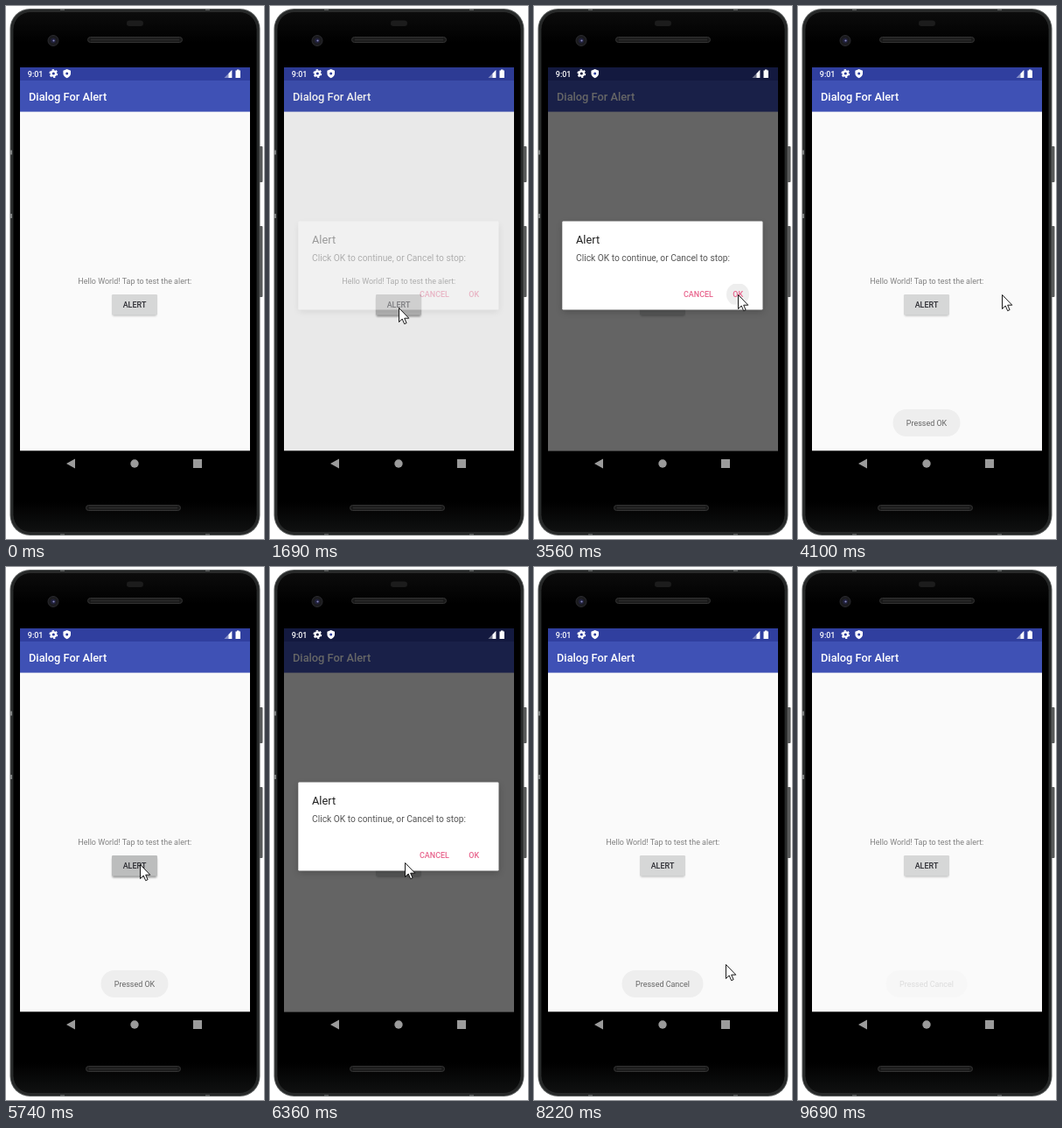
Write an HTML page that moves like this. It is 295x608 px and loops after 9.77 s.

```html
<!DOCTYPE html>
<html lang="en">
<head>
<meta charset="utf-8">
<title>Dialog For Alert</title>
<style>
  html, body { margin: 0; width: 100%; height: 100%; overflow: hidden; background: #fff; }
  svg { display: block; width: 295px; height: 608px; }
  text { font-family: Roboto, sans-serif; font-size: 8.96px; }
  .mid { text-anchor: middle; }
  .bold { font-weight: 500; }
  .big { font-size: 12.8px; }
</style>
</head>
<body>
<svg viewBox="0 0 295 608" xmlns="http://www.w3.org/2000/svg">
  <defs>
    <linearGradient id="face" x1="0" y1="0" x2="0" y2="1">
      <stop offset="0" stop-color="#0c0c0c"/>
      <stop offset=".06" stop-color="#000"/>
      <stop offset=".94" stop-color="#000"/>
      <stop offset="1" stop-color="#101111"/>
    </linearGradient>
    <filter id="soft" x="-20%" y="-30%" width="140%" height="180%">
      <feGaussianBlur stdDeviation="4"/>
    </filter>
    <filter id="near" x="-20%" y="-40%" width="140%" height="190%">
      <feGaussianBlur stdDeviation=".9"/>
    </filter>
    <clipPath id="btnClip"><rect x="121" y="329" width="52" height="23.5" rx="1.3"/></clipPath>
    <clipPath id="okClip"><rect x="213" y="317" width="41" height="23.5" rx="1.3"/></clipPath>
  </defs>

  <!-- phone body -->
  <g>
    <rect x="289" y="160" width="4.5" height="41" rx="1" fill="#585a5a"/>
    <rect x="289" y="251" width="4.5" height="81" rx="1" fill="#585a5a"/>
    <rect x="4.5" y="3" width="286" height="601" rx="23" fill="#565959"/>
    <rect x="5.5" y="4" width="284" height="599" rx="22" fill="#262828"/>
    <rect x="8" y="6.5" width="279" height="594" rx="20" fill="url(#face)" stroke="#303232" stroke-width=".7"/>
    <path d="M5 167H7M5 239.5H7" stroke="#808383" stroke-width="5"/>
    <path d="M62 4H67M228 4H233M62 603H67M228 603H233" stroke="#707373" stroke-width="1.5"/>
    <rect x="138" y="16.5" width="19" height="6.5" rx="3.2" fill="#1c1c1c"/>
    <circle cx="54" cy="39.5" r="6" fill="#1b1b1e" stroke="#2a2a2e"/>
    <circle cx="54" cy="39.5" r="3" fill="#20203a"/>
    <circle cx="54.5" cy="39.5" r="1.1" fill="#8a8cc4"/>
    <rect x="93.5" y="35.5" width="108" height="6" rx="3" fill="#191919" stroke="#343434"/>
    <path d="M97 38.5H198" stroke="#292929" stroke-width="2"/>
    <rect x="91.5" y="569.5" width="108" height="6" rx="3" fill="#191919" stroke="#343434"/>
    <path d="M95 572.5H196" stroke="#292929" stroke-width="2"/>
    <g fill="#9b9b9b">
      <path d="M69 522L79 516.5V527.5Z"/>
      <circle cx="147" cy="522" r="4.7"/>
      <rect x="214" y="517" width="10" height="10"/>
    </g>
  </g>

  <!-- app -->
  <rect x="16" y="70" width="263" height="437.3" fill="#fafafa"/>
  <rect x="16" y="70" width="263" height="15" fill="#303f9f"/>
  <rect x="16" y="85" width="263" height="35.6" fill="#3f51b5"/>
  <text class="big bold" x="26" y="108" fill="#fff">Dialog For Alert</text>
  <text class="mid" x="147.3" y="317.3" fill="#808080">Hello World! Tap to test the alert:</text>
  <rect x="122" y="331" width="50" height="22.5" rx="1.3" opacity=".25" filter="url(#near)"/>
  <rect id="lift" x="121.5" y="332" width="51" height="22.5" rx="1.3" filter="url(#near)"/>
  <rect x="121" y="329" width="52" height="23.5" rx="1.3" fill="#d6d7d7"/>
  <g clip-path="url(#btnClip)"><circle id="ripple"/></g>
  <text class="mid bold" x="147" y="344" fill="#2a2a30">ALERT</text>

  <rect id="dim" x="16" y="70" width="263" height="437.3"/>

  <!-- status icons stay bright -->
  <g fill="#fff">
    <text class="bold" x="24.8" y="80.6">9:01</text>
    <circle cx="54.3" cy="77" r="2.7" fill="none" stroke="#fff" stroke-width="2.2"/>
    <circle cx="54.3" cy="77" r="4.2" fill="none" stroke="#fff" stroke-width="1.5" stroke-dasharray="2.2 2.198"/>
    <path d="M69.7 72L74 73.7V77Q73.8 80.5 69.7 82.3Q65.6 80.5 65.4 77V73.7Z"/>
    <circle cx="69.7" cy="77" r="1.5" fill="#303f9f"/>
    <path d="M249.5 82L258.3 73V82Z" opacity=".4"/>
    <path d="M254.5 77V82H258.3V73Z"/>
    <path d="M262.5 73.5H264V72.5H266.5V73.5H268V82H262.5Z"/>
  </g>

  <g id="dialog">
    <rect x="33" y="249" width="228.5" height="100" opacity=".2" filter="url(#soft)"/>
    <rect x="32.3" y="245.5" width="229.2" height="101" rx="1.3" fill="#fff"/>
    <text class="big" x="48" y="270.6" fill="#222">Alert</text>
    <text x="48" y="290.5" fill="#555" style="font-size:10.24px">Click OK to continue, or Cancel to stop:</text>
    <g clip-path="url(#okClip)"><circle id="okRipple" cx="233" cy="329" fill="#eee"/></g>
    <g class="bold" fill="#e8638c">
      <text x="171" y="331.6">CANCEL</text>
      <text x="227.3" y="331.6">OK</text>
    </g>
  </g>

  <g id="toast">
    <rect id="pill" y="460" height="31" rx="15.5" fill="#eee"/>
    <text id="note" class="mid" x="147" y="479.3" fill="#666"></text>
  </g>

  <path id="cursor" d="M.5 .5V16.5L4.2 13L6.7 18.7L9.1 17.6L6.7 12.2H11.8Z"
        fill="#fff" stroke="#000" stroke-width=".9"/>
</svg>

<script>
const LOOP = 9770, START = 300, STEP = 77.6;
const el = {};
document.querySelectorAll('[id]').forEach(e => el[e.id] = e);

const set = (e, attrs) => { for (const n in attrs) e.setAttribute(n, attrs[n]); };
const ramp = (k, from, length) => Math.min(1, Math.max(0, (k - from) / length));

const smooth = u => u * u * (3 - 2 * u);
const speedUp = u => u ** 1.5;
const slowDown = u => 1 - (1 - u) ** 2;

// Each round: button press, dialog opening, dialog closing, toast end (in steps)
const rounds = [
  { press: 12, x: 147, y: 344, open: 17, opening: 3, close: 42, fade: 70, note: 'Pressed OK', half: 38.5 },
  { press: 66, x: 153, y: 339, open: 70, opening: 4, close: 88, fade: 117, note: 'Pressed Cancel', half: 46.5 }
];

const moves = [
  { at: 0, steps: 10, to: [147, 344], ease: slowDown },
  { at: 24, steps: 13, to: [233, 329], ease: smooth },
  { at: 51, steps: 13, to: [153, 339], ease: smooth },
  { at: 77, steps: 10, to: [184, 330], ease: smooth, arc: 17 },
  { at: 92, steps: 9, to: [217, 445], ease: smooth },
  { at: 101, steps: 7, to: [255, 591], ease: speedUp }
];

function pointer(k) {
  let [x, y] = [246, 571];
  for (const { at, steps, to, ease, arc = 0 } of moves) {
    const u = ease(ramp(k, at, steps));
    x += (to[0] - x) * u;
    y += (to[1] - y) * u - arc * Math.sin(Math.PI * u);
  }
  return [Math.round(x), Math.round(y)];
}

function drawPress(n, x, y) {
  const hold = n < 0 ? 0 : 1 - ramp(n, 6, 2);
  set(el.ripple, { cx: x, cy: y, r: 12 * (1 + Math.max(0, n - 1) ** 2), opacity: .12 * hold });
  set(el.lift, { opacity: .25 * ramp(n, 2, 2) * hold });
}

function drawDialog(k, { open, opening, close }) {
  const u = ramp(k, open, opening), left = 1 - ramp(k, close, 4);
  set(el.dim, { opacity: .6 * u * u * left });
  set(el.dialog, { opacity: u ** .85 * left * left });
}

function drawToast(k, { close, fade, note, half }) {
  const length = fade > 100 ? 5 : 4;
  el.note.textContent = note;
  set(el.pill, { x: 147 - half, width: 2 * half });
  set(el.toast, { opacity: ramp(k, close + 2, 5) * (1 - ramp(k, fade, length)) });
}

function draw(t) {
  const k = Math.floor((t - START) / STEP + .15);
  const [first, second] = rounds;
  const tap = k < second.press ? first : second;
  drawPress(k - tap.press, tap.x, tap.y);
  drawDialog(k, k < second.open ? first : second);
  drawToast(k, k < second.close ? first : second);
  set(el.okRipple, { r: k < second.open ? 13 * slowDown(ramp(k, 38, 3)) : 0 });
  set(el.cursor, {
    transform: `translate(${pointer(k)})`,
    visibility: k >= 0 && k < 109 ? 'visible' : 'hidden'
  });
}

function tick() {
  draw(performance.now() % LOOP);
  requestAnimationFrame(tick);
}
tick();
</script>
</body>
</html>
```
